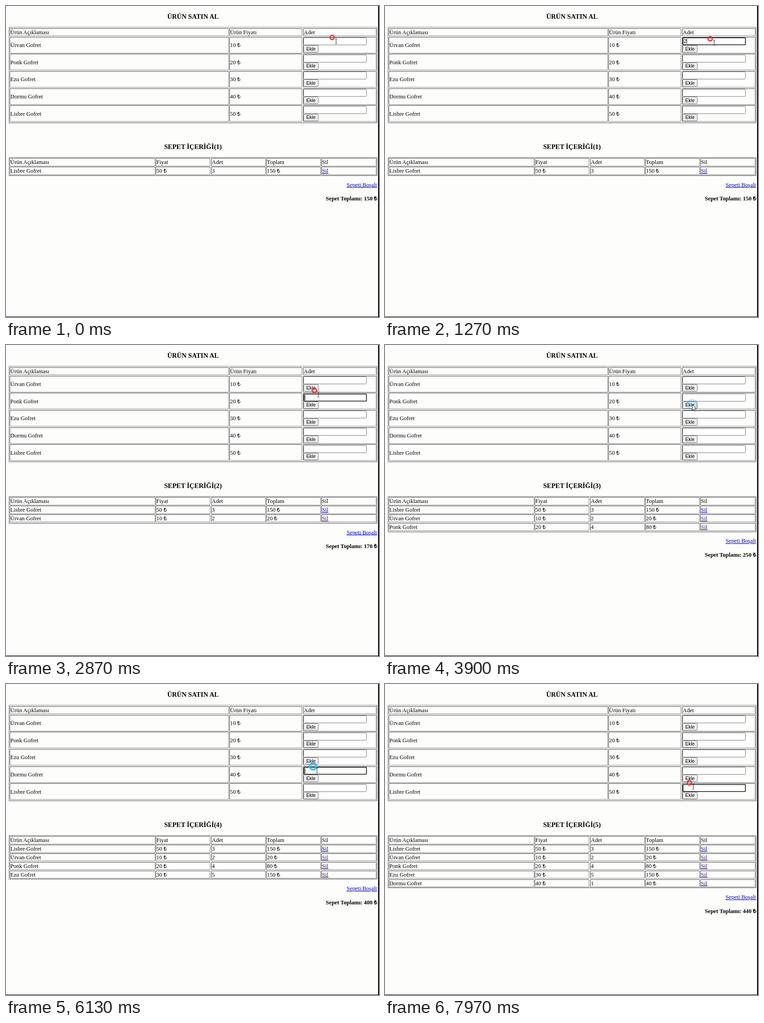
An HTML page for the animation above (8000 ms loop, 820 by 683 pixels).

```html
<!DOCTYPE html>
<html lang="tr">
<head>
<meta charset="utf-8">
<style>
html, body { margin: 0; width: 100%; height: 100%; overflow: hidden; background: #fdfdfc; }
svg { display: block; width: 820px; height: 683px; }
text { font: 12.57px "Liberation Serif", "Times New Roman", serif; fill: #000; }
.head { font-size: 14.7px; font-weight: bold; text-anchor: middle; }
.ui { font: 10.47px "Liberation Sans", Arial, sans-serif; }
.mid { text-anchor: middle; }
.end { text-anchor: end; }
.bold { font-weight: bold; }
.link { fill: #0000c8; text-decoration: underline; }
.seen { fill: #3c1a6e; text-decoration: underline; }
</style>
</head>
<body>
<svg viewBox="0 0 820 683"><g id="page"></g><g id="live"></g></svg>
<script>
const ROW = 37.7, LINE = 18.86, DARK = '#444', LIGHT = '#808080';
const names = ['Ürvan', 'Ponk', 'Ezu', 'Dormu', 'Lisbre'].map(n => n + ' Gofret');
const shopCols = [[8, 489], [491, 650], [653, 813]];
const cartCols = [[8, 327], [329, 448], [451, 570], [572, 691], [693, 813]];

// One visit per product: field click, key press, button click, page reload
const visits = [
  { focus: 330, key: 1000, add: 1950, load: 2150, qty: 2 },
  { focus: 2430, key: 3000, add: 3650, load: 3850, qty: 4 },
  { focus: 4330, key: 4950, add: 5480, load: 5650, qty: 5 },
  { focus: 6030, key: 6400, add: 6750, load: 6900, qty: 1 },
  { focus: 7170, key: 9e9, add: 9e9, load: 9e9 }
];
const clicks = visits.flatMap(v => [v.focus, v.add]);

// Pointer stops: arrive, leave, x, y
const stops = [
  [0, 0, 717, 69], [260, 1250, 715, 72], [1750, 2150, 675, 94],
  [2400, 3150, 678, 100], [3500, 4100, 675, 131], [4300, 4950, 675, 147],
  [5270, 5700, 675, 168], [6000, 6420, 675, 181], [6650, 6940, 675, 205],
  [7150, 8000, 669, 217]
];

const text = (x, y, s, cls = '') => `<text x="${x}" y="${y}" class="${cls}">${s}</text>`;

function bevel(x0, y0, x1, y1, a, b) {
  const draw = (d, c) => `<path transform="translate(.5 .5)" fill="none" stroke="${c}" d="${d}"/>`;
  return draw(`M${x0} ${y1}V${y0}H${x1}`, a) + draw(`M${x0} ${y1}H${x1}V${y0}`, b);
}

function cells(cols, top, height, values, classes = []) {
  const y0 = Math.round(top), y1 = Math.round(top + height) - 1;
  return cols.map(([x0, x1], i) => bevel(x0, y0, x1, y1, DARK, LIGHT) +
    text(x0 + 1.6, top + height / 2 + 4.3, values[i], classes[i])).join('');
}

function box(y, w, h, fill) {
  return `<rect x="654.5" y="${y}" width="${w}" height="${h}" rx="1.8" fill="${fill}" stroke="#767676"/>`;
}

function drawPage() {
  let s = '<path d="M818 0h2v683H0v-1h818z"/>' + text(411, 28, 'ÜRÜN SATIN AL', 'head') +
    bevel(6, 46, 815, 256, LIGHT, DARK) +
    cells(shopCols, 48.6, 17.3, ['Ürün Açıklaması', 'Ürün Fiyatı', 'Adet']);
  names.forEach((name, i) => {
    const y = i * ROW, snap = Math.round(y) + .5;
    s += cells(shopCols, 67.5 + y, 36.1, [name, (i + 1) * 10 + ' ₺', '']) +
      box(69 + snap, 138, 16, '#fff') + box(86 + snap, 32, 15, '#efefef') +
      text(670.5, 97.5 + y, 'Ekle', 'ui mid');
  });
  return s;
}

function drawCart(t) {
  const items = [[4, 3]];
  visits.forEach((v, i) => { if (t >= v.load) items.push([i, v.qty]); });
  const n = items.length, shift = (n - 1) * LINE;
  let total = 0;
  let s = text(411, 313.5, `SEPET İÇERİĞİ(${n})`, 'head') +
    bevel(6, 332, 815, Math.round(371.9 + shift), LIGHT, DARK) +
    cells(cartCols, 334.4, 17.3, ['Ürün Açıklaması', 'Fiyat', 'Adet', 'Toplam', 'Sil']);
  items.forEach(([id, qty], i) => {
    const price = (id + 1) * 10, sum = price * qty;
    total += sum;
    s += cells(cartCols, 334.4 + (i + 1) * LINE, 17.3,
      [names[id], price + ' ₺', qty, sum + ' ₺', 'Sil'],
      ['', '', '', '', i ? 'seen' : 'link']);
  });
  return s + text(815.5, 396.7 + shift, 'Sepeti Boşalt', 'link end') +
    text(816, 427.2 + shift, `Sepet Toplamı: ${total} ₺`, 'bold end');
}

function drawField(t) {
  const i = visits.findIndex(v => t >= v.focus && t < v.load);
  if (i < 0) return '';
  const v = visits[i], y = Math.round(i * ROW), typed = t >= v.key;
  let s = typed ? text(657, 81 + y, v.qty, 'ui') : '';
  if (t < v.add) {
    s += `<rect x="655.2" y="${69.8 + y}" width="137.2" height="15.4" rx="1.5" fill="none" stroke="#101010" stroke-width="1.6"/>`;
    if ((t - (typed ? v.key : v.focus)) % 1000 < 500)
      s += `<rect x="${typed ? 663 : 657}" y="${72 + y}" width="1" height="11"/>`;
  }
  return s;
}

function pointerAt(t) {
  const i = stops.findLastIndex(p => t >= p[0]);
  const [, leave, x, y] = stops[i], next = stops[i + 1];
  if (t <= leave || !next) return [x, y];
  const k = (t - leave) / (next[0] - leave), e = k * k * (3 - 2 * k);
  return [x + (next[2] - x) * e, y + (next[3] - y) * e];
}

function drawPointer(t) {
  const [x, y] = pointerAt(t);
  const overField = (y - 61) % ROW < 17;
  const click = clicks.find(c => t >= c && t < c + 340);
  let s = '<circle r="4.6" fill="none" stroke="#e8282c" stroke-width="2.6"/>';
  if (click !== undefined) {
    const k = (t - click) / 340, r = 5 + 7 * k, fade = Math.min(1, 1.5 - 1.5 * k);
    s = `<g stroke="#35bfee" opacity="${fade}"><circle r="${r}" fill="none" stroke-width="6.5" stroke-opacity=".35"/>` +
      `<circle r="${r}" fill="#35bfee" fill-opacity="${Math.max(0, .8 - 3 * k)}" stroke-width="3"/></g>`;
  }
  s += overField
    ? '<path d="M6.5 3h1.5l.7.7.7-.7h1.5M8.7 3.7v9.6M6.5 14h1.5l.7-.7.7.7h1.5" fill="none" stroke="#222"/>'
    : '<path d="M.5 0V12.6L3.4 10 5.3 14.5 7.3 13.6 5.4 9.2H9.3z" fill="#fff" stroke="#111" stroke-width=".9"/>';
  return `<g transform="translate(${x} ${y})">${s}</g>`;
}

const live = document.getElementById('live');
document.getElementById('page').innerHTML = drawPage();

function frame() {
  const t = performance.now() % 8000;
  live.innerHTML = drawCart(t) + drawField(t) + drawPointer(t);
  requestAnimationFrame(frame);
}
frame();
</script>
</body>
</html>
```
